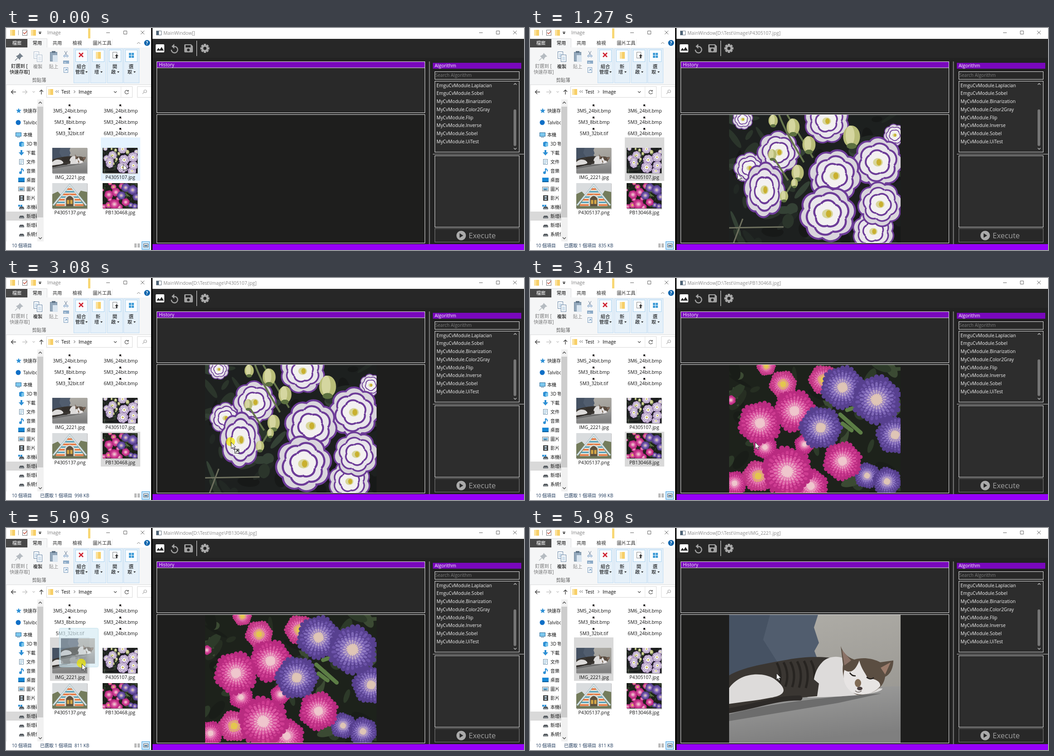
An HTML page that plays this animation: 1142x491 px, repeating every 8170 ms.

```html
<!DOCTYPE html>
<html lang="zh-Hant">
<head>
<meta charset="utf-8">
<title>Drag and drop images</title>
<style>
html, body { margin: 0; width: 100%; height: 100%; overflow: hidden; background: #000; }
svg { display: block; width: 1142px; height: 491px; }
text { font-family: "Open Sans", "Noto Sans CJK TC", "Noto Sans CJK", sans-serif; white-space: pre; }
</style>
</head>
<body>
<svg id="stage" viewBox="0 0 1142 491"></svg>
<script>
const LOOP = 8170;
const TAU = Math.PI * 2;

// Markup helpers
const rect = (x, y, w, h, fill = 'none', more = '') =>
  `<rect x="${x}" y="${y}" width="${w}" height="${h}" fill="${fill}" ${more}/>`;
const frame = (x, y, w, h, fill, stroke) =>
  rect(x + .5, y + .5, w - 1, h - 1, fill, `stroke="${stroke}"`);
const fill = (d, color, more = '') => `<path d="${d}" fill="${color}" ${more}/>`;
const line = (d, color, width = 1, more = '') =>
  `<path d="${d}" fill="none" stroke="${color}" stroke-width="${width}" ${more}/>`;
const disc = (x, y, r, color) => `<circle cx="${x}" cy="${y}" r="${r}" fill="${color}"/>`;
const oval = (x, y, rx, ry, color, more = '') =>
  `<ellipse cx="${x}" cy="${y}" rx="${rx}" ry="${ry}" fill="${color}" ${more}/>`;
const text = (x, y, str, color = '#000', size = 10.3, more = '') =>
  `<text x="${x}" y="${y}" fill="${color}" font-size="${size}" ${more}>${str}</text>`;
const mid = (x, y, str, color, size, more = '') =>
  text(x, y, str, color, size, 'text-anchor="middle" ' + more);
const at = (x, y, body, more = '') => `<g transform="translate(${x} ${y})" ${more}>${body}</g>`;
const photo = (name, x, y, w, h, more = '') =>
  `<use href="#${name}" x="${x}" y="${y}" width="${w}" height="${h}" ${more}/>`;
const symbol = (id, w, h, body) =>
  `<symbol id="${id}" viewBox="0 0 ${w} ${h}" preserveAspectRatio="none">${body}</symbol>`;

function random(seed) {
  return () => (seed = (seed * 16807) % 2147483647) / 2147483647;
}

// Photographs, reduced to simple shapes
function foliage(seed, colors) {
  const rnd = random(seed);
  let out = '';
  for (let i = 0; i < 70; i++) {
    const x = rnd() * 378, y = rnd() * 283;
    out += oval(x, y, 10 + rnd() * 20, 4 + rnd() * 9, colors[i % colors.length],
      `transform="rotate(${rnd() * 180} ${x} ${y})"`);
  }
  return out;
}

function rose([x, y, r, tall = 1]) {
  const rings = [[.62, .4, 8, '#d9d5dc'], [.42, .36, 6, '#e9e6eb'], [.22, .28, 5, '#f3f1f1']];
  let out = '';
  rings.forEach(([dist, size, count, color], k) => {
    for (let i = 0; i < count; i++) {
      const deg = i / count * 360 + x * 7 + k * 25;
      out += oval(dist * r, 0, size * r, size * r * 1.05, color,
        `stroke="#6d3c98" stroke-width="${r * .075}" pathLength="6" stroke-dasharray="1.1 3.9 1 0" transform="rotate(${deg})"`);
    }
  });
  out += oval(0, 0, r * .2, r * .17, '#d8d69a') + oval(r * .04, 0, r * .1, r * .13, '#c9b02f');
  return `<g transform="translate(${x} ${y}) scale(1 ${tall})">${out}</g>`;
}

function bud([x, y, r]) {
  return oval(x, y, r * .85, r * 1.1, '#b9bd78') + oval(x - r * .15, y - r * .1, r * .45, r, '#d5d6a0') +
    oval(x, y + r * .95, r * .5, r * .3, '#5d7140');
}

function roses() {
  const blooms = [[215, 14, 48], [30, 10, 22], [365, 45, 24], [45, 118, 34], [109, 83, 46], [318, 258, 45],
    [78, 166, 44, 1.35], [328, 105, 54], [333, 198, 48], [233, 135, 56], [217, 219, 60]];
  const buds = [[141, 27, 17], [176, 66, 17], [270, 48, 22], [151, 128, 16], [95, 88, 11],
    [121, 180, 11], [97, 13, 12], [144, 151, 9]];
  return rect(0, 0, 378, 283, '#1d201f') + foliage(41, ['#2b352b', '#171918', '#344135', '#222824']) +
    line('M0 250L120 248M30 230L10 283', '#6f715f', 3) +
    blooms.slice(0, 5).map(rose).join('') +
    line('M110 0C125 40 145 70 165 105M128 0L185 95M95 90L130 145M140 150L122 180', '#66764c', 4) +
    blooms.slice(5).map(rose).join('') + buds.map(bud).join('');
}

const PINK = ['#b92b80', '#cf3d92', '#dc55a2', '#e276b0', '#e9a0bf', '#efc6cd'];
const VIOLET = ['#57408f', '#6c53a8', '#8069b9', '#9680c5', '#b9a2c6', '#dfc5b6'];
const OPEN = ['#c03784', '#d44b97', '#e065a8', '#e683b5', '#dfbb68', '#e3c64f'];

function mum([x, y, r, colors]) {
  let out = disc(0, 0, r * .88, colors[0]);
  colors.forEach((color, k) => {
    const outer = r * (1 - k * .15), count = 28 - k * 2;
    let d = '';
    for (let i = 0; i < count; i++) {
      const a = (i + k * .5) / count * TAU;
      const reach = outer * (.94 + .06 * Math.sin(i * 5 + x));
      const c = Math.cos(a), s = Math.sin(a);
      d += `M${c * outer * .65} ${s * outer * .65}L${c * reach} ${s * reach}`;
    }
    const w = r * (.15 - k * .014);
    out += line(d, colors[Math.max(0, k - 2)], w * 1.45, 'stroke-linecap="round"') +
      line(d, color, w * .85, 'stroke-linecap="round"');
  });
  return at(x, y, out + disc(0, 0, r * .17, colors[5]));
}

function mums() {
  const blooms = [[119, 43, 29, OPEN], [208, 33, 31, OPEN], [82, 3, 20, OPEN], [4, 78, 10, PINK],
    [366, 155, 40, VIOLET], [304, 245, 27, VIOLET], [348, 258, 30, VIOLET], [12, 262, 26, PINK],
    [166, 176, 21, PINK], [64, 246, 33, OPEN], [79, 182, 25, PINK], [144, 102, 45, PINK],
    [68, 129, 46, PINK], [250, 50, 46, VIOLET], [325, 77, 52, VIOLET], [202, 139, 45, VIOLET],
    [250, 213, 41, PINK], [180, 268, 36, PINK], [128, 236, 53, PINK]];
  return rect(0, 0, 378, 283, '#1d221b') + foliage(97, ['#2d3a29', '#191d18', '#3b4a33', '#262e22']) +
    line('M245 110L290 150M260 100L285 92M250 130L270 145', '#5c7d45', 9, 'stroke-linecap="round"') +
    blooms.map(mum).join('');
}

function cat() {
  const dark = '#3a3632', white = '#dddbda';
  let stripes = '';
  for (let i = 0; i < 6; i++) stripes += `M${105 + i * 15} ${106 - i}q14 26 4 ${52 + i * 2}`;
  return rect(0, 0, 378, 283, 'url(#wall)') +
    fill('M0 0H196L187 28L198 62L188 80L194 96L0 135Z', '#515d6e') +
    fill('M0 0H90L75 55L110 110L0 135Z', '#465263') +
    fill('M0 205C120 190 240 160 378 158V283H0Z', 'url(#ground)') +
    fill('M0 220C80 198 200 182 335 174L240 195L0 235Z', '#6c6c6c') +
    fill('M0 134C30 116 80 108 130 99C170 91 215 92 242 98L250 155C220 184 180 178 150 184C100 183 80 205 0 214Z', dark) +
    line(stripes, '#272421', 5) +
    fill('M0 162C25 126 75 126 100 142C127 162 130 178 88 184C60 190 30 192 0 197Z', white) +
    line('M0 212C60 202 105 183 156 184', '#2d2a28', 11, 'stroke-linecap="round"') +
    fill('M206 104C222 88 252 90 264 104C270 140 295 162 338 163C335 178 230 182 172 183C194 165 176 135 206 104Z', white) +
    fill('M186 142L198 152L194 180L160 183Z', dark) +
    fill('M246 69C250 82 260 94 276 99C300 92 322 99 333 105L362 101C362 122 352 134 344 137C340 166 310 178 282 177C262 170 247 140 251 110Z', '#5b4e42') +
    fill('M249 78L269 101L254 112Z', '#8b7267') + fill('M356 105L334 117L344 132Z', '#9b7b6b') +
    fill('M287 101C292 122 302 130 305 140C328 142 334 150 333 158C318 177 288 181 270 171C253 158 250 140 254 122C270 132 280 120 287 101Z', '#e7e4e3') +
    oval(284, 151, 7, 9, '#806b55') + oval(288, 163, 6, 4, '#4c4040') +
    line('M266 128q5 8 13 7M303 138q9 7 16 1', '#231f1d', 2.5) +
    line('M278 168q7 6 14 0', '#655b57', 1.5);
}

function house() {
  let bands = '';
  for (let i = 0; i < 7; i++) bands += rect(0, 12 + i * 6, 76, 3, i % 2 ? '#4b9dba' : '#e66b2f');
  return rect(0, 0, 76, 57, '#d9dcde') + fill('M0 25L12 19L22 30V57H0ZM76 20L62 17L54 30V57H76Z', '#747c5c') +
    `<clipPath id="gable"><path d="M38 5L68 48V52H8V48Z"/></clipPath>` +
    `<g clip-path="url(#gable)">${rect(0, 0, 76, 57, '#e9dfd2')}${bands}</g>` +
    line('M2 50L38 4L74 50', '#a7bfc6', 4) + line('M2 50L38 4L74 50', '#eef2f2', 1.5) +
    fill('M27 54V34Q38 18 49 34V54Z', '#d6d9d4') + fill('M30 54V35Q38 23 46 35V54Z', '#5d503d') +
    rect(32, 38, 5, 9, '#d3a546') + rect(39, 38, 5, 9, '#d3a546') + rect(0, 52, 76, 5, '#6f7759');
}

const folder = (x, y, w = 11, h = 13) => rect(x, y, w, h, '#f7cf68') + rect(x, y, w * .45, h, '#fbe19a');
const windowButtons = (x, gap, y) =>
  line(`M${x - 4} ${y + .5}h8M${x + gap - 3.5} ${y - 3.5}h7v7h-7zM${x + gap * 2 - 4} ${y - 4}l8 8m0 -8l-8 8`, '#666');

function sidebar() {
  const names = ['快速存取', 'Talvibox', '本機', '3D 物件', '下載', '文件', '音樂', '桌面', '圖片', '影片',
    '本機磁碟', '新增磁碟', '新增磁碟', '系統保留'];
  const ys = names.map((_, i) => i < 2 ? 183 + i * 26 : 196 + i * 20);
  const blue = '#2d8fd5';
  const disk = y => fill(`M29 ${y + 1}l2 -3h7l2 3v3h-11z`, '#565b60') + rect(30, y + 2, 9, 1, '#b9c0c5');
  const icons = [
    fill('M28 177l1.6 4 4.4 .3-3.4 2.8 1.1 4.2-3.7-2.3-3.7 2.3 1.1-4.2-3.4-2.8 4.4-.3z', blue),
    disc(27, 209, 5.5, '#0f6fc6'),
    frame(21, 231, 13, 9, '#7dc8ee', '#2f6f9d') + rect(24, 241, 7, 1, '#2f6f9d'),
    fill('M29 253l5-2 6 2v8l-6 2-5-2z', blue) + fill('M34 255l6-2v8l-6 2z', '#77c4ea'),
    fill('M32 270h4v5h4l-6 7-6-7h4z', blue),
    frame(29, 290, 10, 12, '#fff', '#6c8ea8') + line('M31 293.5h6m-6 3h6m-6 3h4', '#6ca5c9'),
    line('M34 311v8M34 311q5 2 4 6', blue, 2) + disc(32, 320, 3, blue),
    rect(27, 331, 14, 10, '#1687d4') + rect(27, 339, 14, 2, '#0c5f9e'),
    frame(27, 351, 14, 10, '#fff', '#777') + rect(29, 353, 10, 6, '#7ab9df') + fill('M29 359l4-3 6 3z', '#3f6c85'),
    rect(29, 370, 11, 12, '#444') + rect(32, 372, 5, 3, '#b5cfe0') + rect(32, 377, 5, 3, '#b5cfe0'),
    disk(397) + rect(27, 391, 4, 4, blue) + rect(32, 391, 4, 4, blue), disk(417), disk(437), disk(457)];
  return rect(1, 406, 68, 20, '#d9d9d9') + icons.join('') +
    `<clipPath id="side"><path d="M0 158H68V472H0Z"/></clipPath><g clip-path="url(#side)">` +
    names.map((n, i) => text(i < 3 ? 38 : 45, ys[i] + 4, n, '#111', 10)).join('') + '</g>' +
    rect(69, 158, 14, 314, '#f1f1f1') + rect(69, 174, 13, 245, '#cdcdcd') +
    line('M72 167l3.5 -3.5 3.5 3.5M72 463l3.5 3.5 3.5 -3.5', '#555', 1.5);
}

function ribbon() {
  const groups = [[149, '組合', '管理'], [186, '新', '增'], [223, '開', '啟'], [259, '選', '取']];
  const art = [line('M161 55l9 9m0 -9l-9 9', '#cf2230', 2.5), folder(198, 53, 11, 15),
    frame(235, 53, 10, 14, '#fff', '#888') + fill('M240 62l4-4 4 4h-2.500v5h-3v-5z', '#333'),
    [0, 1, 2, 3].map(i => rect(271 + i % 2 * 6, 55 + (i >> 1) * 6, 5, 5, '#3e9bd6')).join('')];
  const doc = (x, y) => frame(x, y, 12, 16, '#fff', '#6785a6') + line(`M${x + 3} ${y + 5.5}h6m-6 3h6m-6 3h6`, '#7eaad0');
  return rect(0, 43, 320, 82, '#f5f6f7') + rect(0, 125, 320, 1, '#dadbdc') +
    rect(0, 24, 47, 19, '#474747') + mid(24, 37, '檔案', '#fff') +
    line('M47.5 43V23.500H90.5V43', '#dadbdc') + rect(48, 24, 42, 21, '#f5f6f7') +
    mid(69, 37, '常用') + mid(113, 37, '共用', '#222') + mid(157, 37, '檢視', '#222') + mid(212, 37, '圖片工具', '#222') +
    line('M234.500 24v15', '#eee') + line('M289 35l3.500 -3.500 3.500 3.500', '#777') +
    disc(311, 33, 6.5, '#0a64ad') + mid(311, 37, '?', '#fff', 10, 'font-weight="700"') +
    `<g id="pin">${at(29, 63, fill('M1 -8L9 0L5 1L2 5L2 8L-7 -1L-4 -2L0 -5Z', '#76818c') + line('M-3 3L-9 9', '#76818c', 1.5))}
      ${text(11, 88, '釘選到 [')}${text(8, 101, '快速存取]')}</g>` +
    `<g id="copy">${doc(61, 52) + doc(68, 59)}${mid(70, 89, '複製')}</g>` +
    frame(97, 53, 16, 21, '#92a7bb', '#72889c') + rect(101, 51, 8, 4, '#627689') + rect(103, 60, 11, 15, '#d9e5f0') +
    mid(105, 89, '貼上', '#888') +
    line('M129 51l5 9m1 -9l-5 9', '#70839a') + line('M127 62a2 2 0 1 0 4 0a2 2 0 1 0 -4 0m6 0a2 2 0 1 0 4 0a2 2 0 1 0 -4 0', '#5c89bc') +
    rect(126, 72, 13, 7, '#8aa9c6') + mid(132.5, 78, 'w...', '#fff', 6) +
    frame(127, 87, 10, 12, '#f3f7fb', '#7a9cbd') + line('M130 95l4 -4m-3 0h3v3', '#4d83b5') +
    mid(73, 119, '剪貼簿', '#555') +
    groups.map(([x, a, b], i) => frame(x, 45, 35, 77, '#e5f0f9', '#c0dcf3') + frame(x + 4, 48, 27, 27, '#f8fcff', '#a9d2ef') +
      art[i] + mid(x + 17, 89, a) + mid(x + 14, 101, b) + fill(`M${x + (i ? 22 : 26)} 96h5l-2.500 3z`, '#222')).join('');
}

function explorer() {
  const tiny = (x, y) => rect(x - 2, y - 2, 4, 4, '#222') + rect(x + 1, y + 1, 2, 2, '#b9a5a0');
  const small = ['3M5_24bit.bmp', '3M6_24bit.bmp', '5M3_8bit.bmp', '5M3_24bit.bmp', '5M3_32bit.tif', '6M3_24bit.bmp'];
  const big = [['cat', 'IMG_2221.jpg'], ['roses', 'P4305107.jpg'], ['house', 'P4305137.png'], ['mums', 'PB130468.jpg']];
  return rect(0, 0, 320, 491, '#fff') + rect(0, 0, 1, 491, '#ddd') +
    folder(9, 4) + line('M27.500 5v11', '#999') + frame(36, 4, 11, 13, '#fff', '#777') + line('M38 10l3 3 5 -6', '#c2503f', 1.5) +
    folder(55, 4) + fill('M72 10h6l-3 4z', '#333') + rect(72, 8, 6, 1, '#333') +
    text(91, 14, 'Image', '#808080', 10.4) + rect(181, 1, 5, 22, '#f8d775') + windowButtons(225, 38, 10) +
    ribbon() +
    line('M22 141.500H12M16 137l-4.500 4.500 4.500 4.500', '#444', 1.4) + line('M36 141.500h10M42 137l4.500 4.500 -4.500 4.500', '#c4c4c4', 1.4) +
    line('M58.500 140l2.500 2.500 2.500 -2.500', '#999') + line('M78 147V137M74 141l4 -4 4 4', '#444', 1.4) +
    frame(89, 129, 190, 25, '#fff', '#d9d9d9') + folder(93, 135) +
    line('M112 138l-2.500 2.500 2.500 2.500m4 -5l-2.500 2.500 2.500 2.500M149.500 138l3 3 -3 3', '#444') +
    text(122, 145, 'Test') + text(160, 145, 'Image') + line('M238 140l3 3 3 -3', '#555', 1.3) +
    line('M253.500 130v23', '#e5e5e5') + line('M269 139a4 4 0 1 0 1 4M270 137v3h-3', '#555', 1.2) +
    line('M320 129.500H289.500V153.500H320', '#d9d9d9') + line('M304 142l-3 4M304 140a3 3 0 1 0 6 0a3 3 0 1 0 -6 0', '#aaa', 1.2) +
    sidebar() + rect(0, 472, 320, 19, '#fff') +
    `<rect id="hover" width="87" fill="#e5f3ff"/><rect id="chosen" width="87" fill="#d9d9d9"/>` +
    small.map((n, i) => {
      const x = 141 + i % 2 * 112, y = 187 + (i >> 1) * 25;
      return tiny(x - 1, y - 16 + (i > 1 ? 2 : 0)) + mid(x, y, n, '#111', 10.3);
    }).join('') +
    big.map(([pic, n], i) => {
      const x = 102 + i % 2 * 111, y = 265 + (i >> 1) * 78;
      return rect(x + 1, y + 1, 77, 57, '#bbb') + photo(pic, x, y, 77, 56) + mid(x + 39, y + 69, n, '#111', 10.4);
    }).join('') +
    text(13, 485, '10 個項目', '#1e395b', 10) + text(75, 485, '', '#1e395b', 10, 'id="status"') +
    [0, 1, 2].map(i => rect(283, 477 + i * 3, 5, 2, '#999') + rect(290, 477 + i * 3, 5, 2, '#999')).join('') +
    frame(299, 472, 18, 18, '#cce8ff', '#3c9cdc') + frame(303, 477, 11, 8, '#fff', '#555') + rect(305, 480, 7, 3, '#467ba0');
}

function app() {
  const items = ['EmguCvModule.Laplacian', 'EmguCvModule.Sobel', 'MyCvModule.Binarization', 'MyCvModule.Color2Gray',
    'MyCvModule.Flip', 'MyCvModule.Inverse', 'MyCvModule.Sobel', 'MyCvModule.UiTest'];
  let teeth = '';
  for (let i = 0; i < 8; i++) teeth += `<rect x="-2.500" y="-10" width="5" height="5" fill="#a9a9a9" transform="rotate(${i * 45})"/>`;
  const purple = '#7908bc', edge = '#e8e8e8';
  return rect(320, 0, 3, 491, '#000') + rect(323, 0, 819, 24, '#fff') + rect(323, 24, 819, 454, '#222') + rect(323, 24, 819, 42, '#272727') +
    frame(331, 6, 12, 10, '#fff', '#6b7782') + rect(332, 7, 5, 8, '#4e6478') +
    text(347, 15, '', '#8a8a8a', 10.33, 'id="title"') + windowButtons(1047, 37.5, 10) +
    rect(330, 36, 19, 18, '#fff', 'rx="2"') + fill('M332 50l4-6 3 4 4-6 5 8z', '#272727') +
    line('M367 41h5a7 7 0 1 1 -7.500 7', '#a0a0a0', 2.4) + fill('M371 35v11l-6-5.500z', '#a0a0a0') +
    fill('M393 38q0-2 2-2h13l4 4v12q0 2-2 2h-15q-2 0-2-2z', '#a0a0a0') + rect(396, 38, 11, 5, '#272727') + disc(402, 48.500, 3, '#272727') +
    rect(420, 28, 1, 34, '#eee') + at(438.500, 45, teeth + disc(0, 0, 7.500, '#a9a9a9') + disc(0, 0, 3.500, '#272727')) +
    frame(332, 74, 592, 114, '#292929', edge) + rect(333, 75, 590, 13, purple) + rect(333, 87.500, 590, 1, edge) +
    text(337, 85, 'History', '#fff', 10.2) + frame(332, 191, 592, 285, '#1e1e1d', edge) +
    ['roses', 'mums', 'cat'].map(n => photo(n, 439, 192, 378, 283, `id="big-${n}" display="none"`)).join('') +
    rect(932.500, 74, 2, 404, '#7d7d7d') + rect(941, 77, 195, 13, purple) + text(945, 87, 'Algorithm', '#fff', 10.3) +
    frame(945, 96, 187, 18, '#282828', edge) + text(946.500, 107.500, 'Search Algorithm', '#7b7b7b', 10) +
    frame(945, 117, 187, 158, '#2d2d2d', edge) +
    items.map((n, i) => text(949, 130.700 + i * 17.700, n, '#f4f4f4', 10.2)).join('') +
    line('M1119.500 125.500l3 -3 3 3M1119.500 265.500l3 3 3 -3', '#ccc', 1.2) + rect(1119, 180, 6, 81, '#757575', 'rx="3"') +
    rect(941, 278, 201, 2, '#7d7d7d') + frame(945, 282, 187, 159, '#2d2d2d', edge) +
    frame(945, 443, 187, 31, '#282828', '#858585') + disc(1003.500, 459, 10.500, '#aaa') + fill('M1000 454v10l8-5z', '#282828') +
    text(1020, 465, 'Execute', '#a2a2a2', 16.5) + rect(323, 478, 819, 13, '#9600fa');
}

const gradient = (id, a, b) => `<linearGradient id="${id}" x1="0" y1="0" x2="0.300" y2="1"><stop stop-color="${a}"/><stop offset="1" stop-color="${b}"/></linearGradient>`;

document.getElementById('stage').innerHTML =
  '<defs>' + gradient('wall', '#b1afa9', '#96948f') + gradient('ground', '#a0a09f', '#7f7f7f') +
  symbol('roses', 378, 283, roses()) + symbol('mums', 378, 283, mums()) + symbol('cat', 378, 283, cat()) +
  symbol('house', 76, 57, house()) + '</defs>' + app() + explorer() +
  `<g id="ghost">${rect(.5, .5, 86, 86, '#d3ebf4', 'rx="3" stroke="#a9d3e3" opacity=".65"')}${photo('cat', 4, 23, 75, 56, 'id="ghostPic" opacity=".6"')}</g>` +
  '<g id="pointer">' + `<circle id="press" cx="-1" cy="-1" r="10" fill="#f0e800" opacity=".72"/>` +
  fill('M.500 .5V14.500L3.700 11.600L6 16.600L8.200 15.600L6 10.800H10.500Z', '#fff', 'stroke="#222" stroke-width=".9"') +
  `<g id="badge">${frame(8, 15, 10, 10, '#fff', '#222')}${line('M10.500 22.500L15 18M11.500 17.500H15.500V21.500', '#111', 1.3)}</g></g>`;

// Timeline
const smooth = p => p * p * (3 - 2 * p);
const moves = [ // start, end, steps, from, to, easing
  [250, 1000, 12, [258, 301], [456, 322], smooth],
  [1140, 1270, 2, [456, 322], [457, 322], smooth],
  [1800, 2280, 8, [457, 322], [247, 372], smooth],
  [2680, 3080, 6, [247, 372], [496, 363], smooth],
  [4000, 4550, 9, [496, 363], [163, 300], p => 1 - (1 - p) ** 2.4],
  [5090, 5510, 7, [163, 300], [543, 321], p => p ** 2.3]
];
const drags = [ // press, ghost, drop, picture, file, size, cell
  [250, 320, 1140, 'roses', 'P4305107.jpg', 835, [209, 242, 96]],
  [2680, 2680, 3410, 'mums', 'PB130468.jpg', 998, [209, 340, 77]],
  [4750, 5090, 5980, 'cat', 'IMG_2221.jpg', 811, [97, 242, 96]]
];
const cells = [...drags.map(d => d[6]), [97, 340, 77]];

function pointerAt(t) {
  let spot = moves[0][3];
  for (const [start, end, steps, from, to, ease] of moves) {
    if (t < start) break;
    const done = Math.min(steps, Math.floor((t - start) / (end - start) * (steps - 1) + .001) + 1);
    const p = ease(done / steps);
    spot = from.map((v, i) => Math.round(v + (to[i] - v) * p));
  }
  return spot;
}

const $ = id => document.getElementById(id);
const show = (id, on) => $(id).setAttribute('display', on ? 'inline' : 'none');
const setText = (id, str) => { if ($(id).textContent !== str) $(id).textContent = str; };
function place(id, cell) {
  show(id, cell);
  if (!cell) return;
  ['x', 'y', 'height'].forEach((key, i) => $(id).setAttribute(key, cell[i]));
}

function draw(t) {
  const [x, y] = pointerAt(t);
  const chosen = drags.filter(d => t >= d[0]).pop();
  const loaded = drags.filter(d => t >= d[2]).pop();
  const held = chosen && t < chosen[2];
  const overApp = x > 321;

  $('pointer').setAttribute('transform', `translate(${x} ${y})`);
  show('press', held);
  show('badge', held && overApp);
  show('ghost', held && t >= chosen[1] && !overApp);
  $('ghost').setAttribute('transform', `translate(${x - 50} ${y - 79})`);
  if (chosen) $('ghostPic').setAttribute('href', '#' + chosen[3]);

  place('hover', !held && cells.find(([cx, cy, h]) => x >= cx && x < cx + 87 && y >= cy && y < cy + h));
  place('chosen', chosen && chosen[6]);
  $('pin').setAttribute('opacity', chosen ? .5 : 1);
  $('copy').setAttribute('opacity', chosen ? 1 : .5);
  setText('status', chosen ? `已選取 1 個項目  ${chosen[5]} KB` : '');
  setText('title', `MainWindow[${loaded ? 'D:\\Test\\Image\\' + loaded[4] : ''}]`);
  drags.forEach(d => show('big-' + d[3], d === loaded));
}

function tick() {
  draw(performance.now() % LOOP);
  requestAnimationFrame(tick);
}
tick();
</script>
</body>
</html>
```
